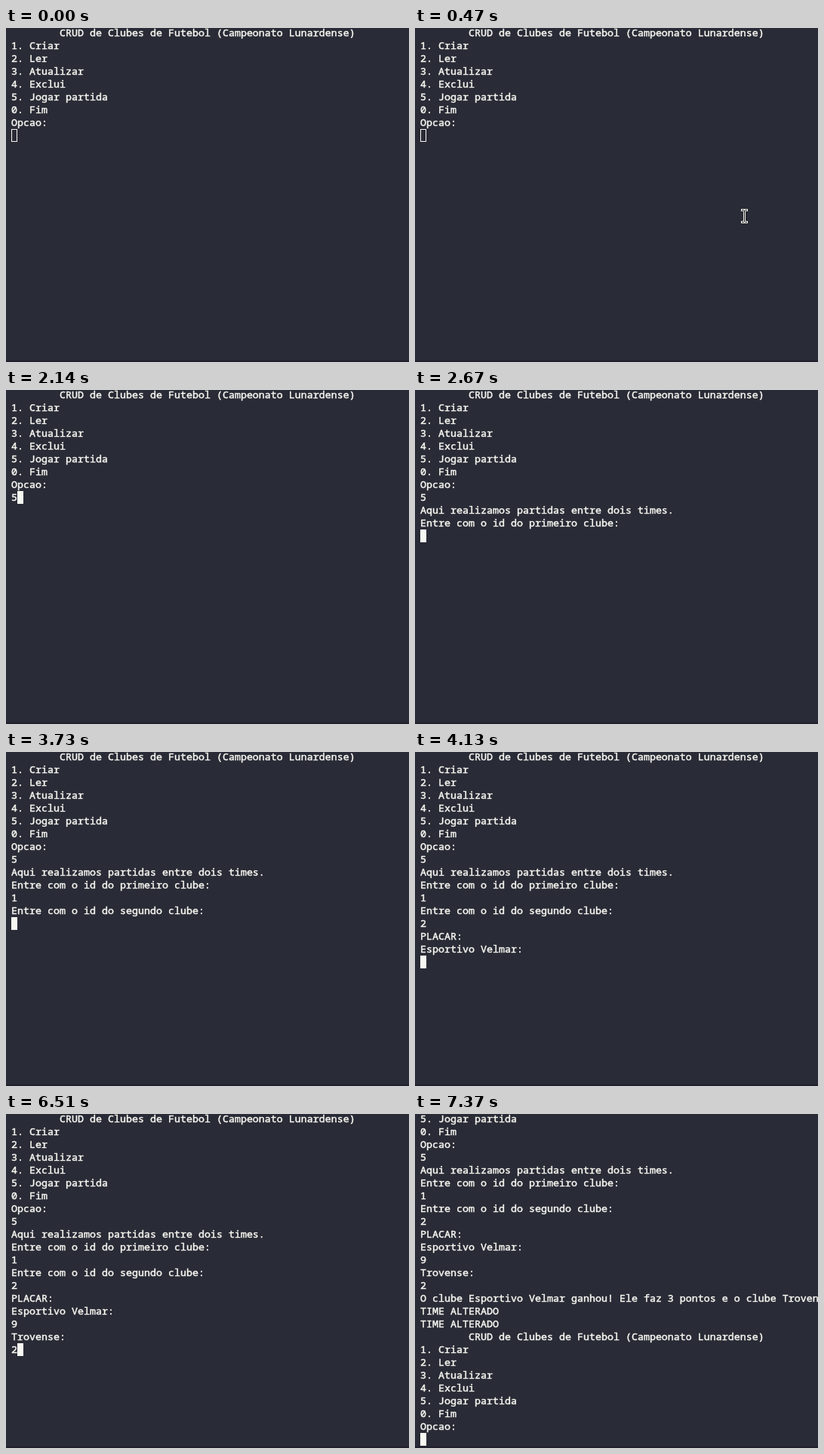
Animation, 534 px wide and 443 px high, one loop 8000 ms. Source, as an HTML page:

```html
<!DOCTYPE html>
<html lang="pt">
<head>
<meta charset="utf-8">
<style>
  html, body { margin: 0; width: 100%; height: 100%; overflow: hidden; background: #292b36; }
  svg { display: block; }
  text {
    font: 500 13.3333px "Noto Sans Mono", "DejaVu Sans Mono", monospace;
    font-variant-ligatures: none;
    fill: #f8f8f2;
    stroke: #f8f8f2;
    stroke-width: 0.45px;
    white-space: pre;
  }
</style>
</head>
<body>
<svg width="534" height="443" viewBox="0 0 534 443">
  <defs>
    <path id="beam" d="M1.5 1.5h2l1 1l1-1h2M4.5 2.5v14M1.5 17.5h2l1-1l1 1h2"/>
  </defs>
  <rect y="441" width="534" height="2" fill="#211f2d"/>
  <g id="screen"></g>
  <rect id="caret" stroke="#f8f8f2" width="7" height="16"/>
  <g id="pointer" fill="none" stroke-linecap="square">
    <use href="#beam" stroke="#f8f8f2" stroke-width="3"/>
    <use href="#beam" stroke="#111"/>
  </g>
</svg>
<script>
const LOOP = 8000, ROWS = 26, LINE = 17, CHAR = 8, LEFT = 7, TOP = -2;

const menu = `        CRUD de Clubes de Futebol (Campeonato Lunardense)
1. Criar
2. Ler
3. Atualizar
4. Exclui
5. Jogar partida
0. Fim
Opcao:
`;
const home = "Esportivo Velmar", away = "Trovense";

// Terminal output: [time in ms, text appended]
const output = [
  [0, menu],
  [2140, "5"],
  [2670, "\nAqui realizamos partidas entre dois times.\nEntre com o id do primeiro clube:\n"],
  [3460, "1"],
  [3730, "\nEntre com o id do segundo clube:\n"],
  [4000, "2"],
  [4130, `\nPLACAR:\n${home}:\n`],
  [5190, "9"],
  [5980, `\n${away}:\n`],
  [6510, "2"],
  [7370, `\nO clube ${home} ganhou! Ele faz 3 pontos e o clube ${away} faz 0.\nTIME ALTERADO\nTIME ALTERADO\n${menu}`]
];

const [screen, caret, pointer] = ["screen", "caret", "pointer"].map(id => document.getElementById(id));

const rows = Array.from({ length: ROWS }, (_, i) => {
  const row = document.createElementNS("http://www.w3.org/2000/svg", "text");
  row.setAttribute("x", LEFT);
  row.setAttribute("y", TOP + i * LINE + 13);
  return screen.appendChild(row);
});

let shown = "";

function drawText(t) {
  const text = output.filter(([at]) => at <= t).map(([, s]) => s).join("");
  if (text === shown) return;
  shown = text;
  const lines = text.split("\n").slice(-ROWS);
  rows.forEach((row, i) => row.textContent = lines[i] || "");
  const last = lines.length - 1;
  caret.setAttribute("x", LEFT + lines[last].length * CHAR + 0.5);
  caret.setAttribute("y", TOP + last * LINE + 0.5);
}

// The mouse enters in 70 ms steps, rests, nudges and hides
function drawPointer(t) {
  const steps = from => Math.max(0, Math.min(3, Math.floor((t - from) / 70)));
  const left = 1 - steps(260) / 3;
  const nudge = steps(600);
  const x = Math.round(432 + 52 * left + 4 * nudge);
  const y = Math.round(240 + 150 * left + 0.7 * nudge);
  pointer.setAttribute("transform", `translate(${x} ${y})`);
  pointer.setAttribute("visibility", t >= 260 && t < 880 ? "visible" : "hidden");
}

function draw(now) {
  const t = now % LOOP;
  drawText(t);
  drawPointer(t);
  caret.setAttribute("fill", t < 740 ? "none" : "#f8f8f2");
  requestAnimationFrame(draw);
}

requestAnimationFrame(draw);
</script>
</body>
</html>
```
